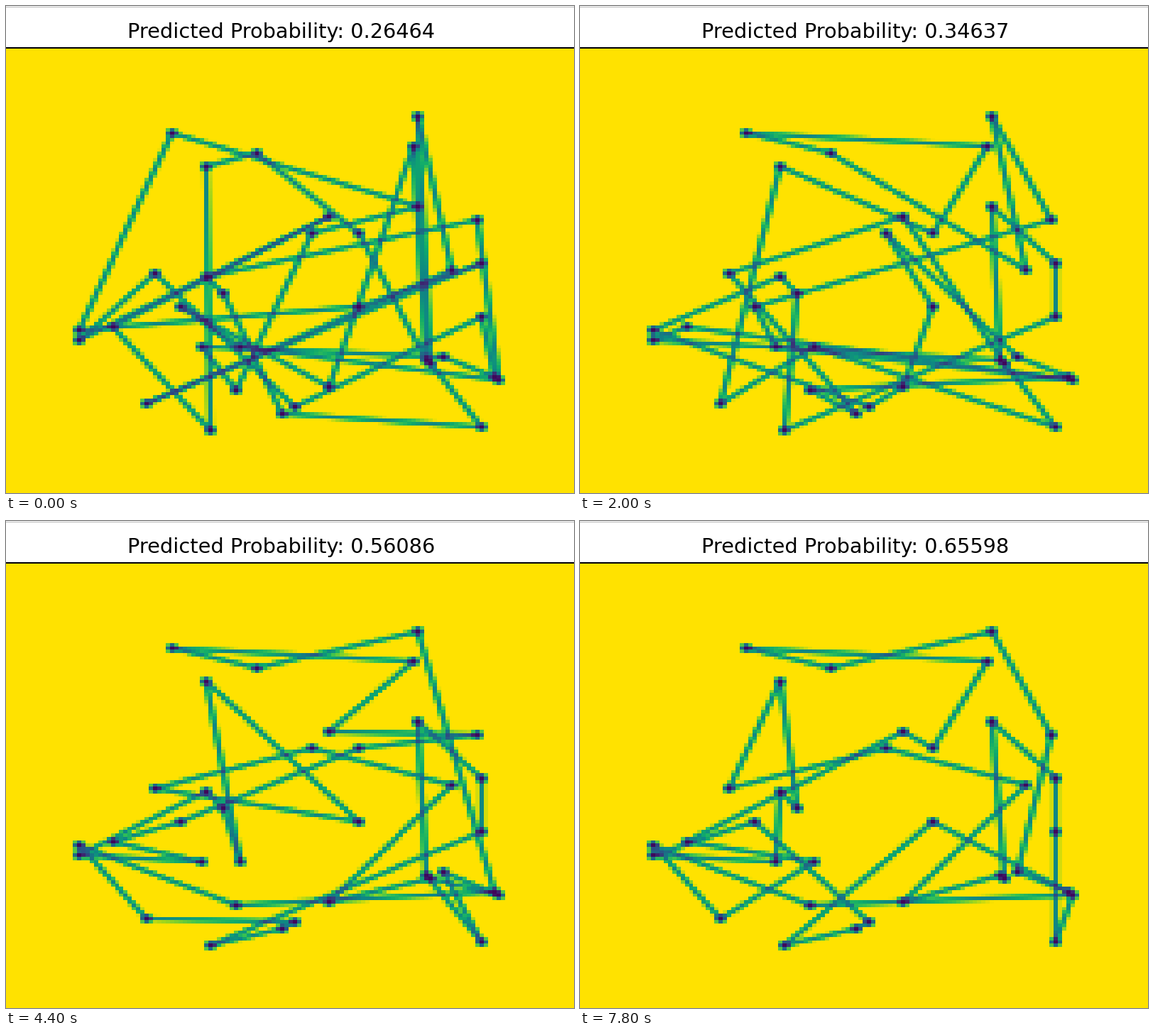
A matplotlib script that plays this animation: 800 by 686 pixels, repeating every 8000 ms.

```python
import numpy as np
import matplotlib.pyplot as plt
from matplotlib.animation import FuncAnimation
from matplotlib.colors import LinearSegmentedColormap

W, H, DPI = 800, 686, 100
X0, Y0, CELL_W, CELL_H = -1.7, 59, 5.97, 4.705
SIZE = 135
INTERVAL, HOLD = 200, 5

# Grid cell (column, row) of each city
CITIES = dict(
    A=(17, 84), B=(17, 87), C=(25, 83), D=(33, 106), E=(35, 67), F=(39, 25),
    G=(41, 77), H=(46, 89), I=(47, 35), J=(47, 68), K=(48, 114), L=(51, 73),
    M=(54, 102), N=(55, 89), O=(59, 31), P=(65, 109), Q=(68, 107),
    R=(72, 55), S=(76, 50), T=(76, 101), U=(83, 55), V=(83, 77), W=(96, 29),
    X=(97, 20), Y=(97, 47), Z=(99, 93), a=(100, 94), b=(103, 92),
    c=(105, 66), d=(111, 51), e=(112, 64), f=(112, 80), g=(115, 98),
    h=(116, 99), i=(112, 113))


def two_opt(tour, part):
    """Improve or undo a tour by running one stretch of it backwards."""
    return tour.replace(part, part[::-1])


start = "AFYRMHbgfQEBSCKIOUZWTGNhdJLPiaXcDeV"
early = "APMgbRVTQESaiNDIUWFOcXdGHhCBZYefKLJ"
final = "AMhifeYaZTcREILJHBGQPKVgbdXOFWUSCND"
STEPS = [
    (start, 0.26464),
    (early, 0.33063),
    (two_opt(early, "PMgbRVTQ"), 0.34637),
    ("AESUWFOLVQPKfYZTMNBCegRbhHGdXiacIDJ", 0.40534),
    ("AMgXOFWSdUGCHBJLNIVERcTahbiZYefKPQD", 0.56086),
    ("AMgXOFWSdUGCHBJLNIEQDZcRVaiYefKPhbT", 0.64101),
    (two_opt(final, "XOFWU"), 0.64873),
    (final, 0.65598),
]

LINE_R, LINE_ALPHA = 0.6, 0.55
DOT_R, DOT_ALPHA = 1.15, 0.96
gx, gy = np.meshgrid(np.arange(SIZE), np.arange(SIZE))


def distance(p, q):
    """Distance of every cell from the segment p-q."""
    (x, y), dx, dy = p, q[0] - p[0], q[1] - p[1]
    t = ((gx - x) * dx + (gy - y) * dy) / max(dx * dx + dy * dy, 1)
    t = np.clip(t, 0, 1)
    return np.hypot(gx - x - t * dx, gy - y - t * dy)


def ink(p, q, radius, alpha):
    return 1 - alpha * np.clip(radius + 0.5 - distance(p, q), 0, 1)


def render(tour):
    grid = np.ones((SIZE, SIZE))
    for a, b in zip(tour, tour[1:] + tour[0]):
        grid *= ink(CITIES[a], CITIES[b], LINE_R, LINE_ALPHA)
    for p in CITIES.values():
        grid *= ink(p, p, DOT_R, DOT_ALPHA)
    return grid


cmap = LinearSegmentedColormap.from_list("tour", [
    (0, "#40065a"), (0.12, "#3c2b74"), (0.25, "#2a5486"), (0.45, "#0f8784"),
    (0.62, "#10ab6c"), (0.75, "#3cc350"), (0.88, "#a2d61c"), (1, "#ffe200"),
])
images = [render(tour) for tour, _ in STEPS]

fig = plt.figure(figsize=(W / DPI, H / DPI), dpi=DPI, facecolor="white")
ax = fig.add_axes([0, 0, 1, 1])
picture = ax.imshow(
    images[0], cmap=cmap, vmin=0, vmax=1, interpolation="nearest",
    aspect="auto",
    extent=(X0, X0 + SIZE * CELL_W, Y0 + SIZE * CELL_H, Y0))
ax.set_xlim(0, W)
ax.set_ylim(H, 0)
ax.axis("off")

px = 72 / DPI
ax.axhline(Y0, color="black", lw=2 * px)
for y in (0.5, H - 0.5):
    ax.axhline(y, color="#b8b8b8", lw=px)
title = ax.text(387.3, 45, "", ha="center", va="baseline", color="black",
                family="DejaVu Sans", size=28.7 * px)


def update(frame):
    step = frame // HOLD
    picture.set_data(images[step])
    title.set_text(f"Predicted Probability: {STEPS[step][1]:.5f}")
    return picture, title


anim = FuncAnimation(fig, update, frames=len(STEPS) * HOLD,
                     interval=INTERVAL, init_func=lambda: update(0),
                     repeat=True)
plt.show()
```
